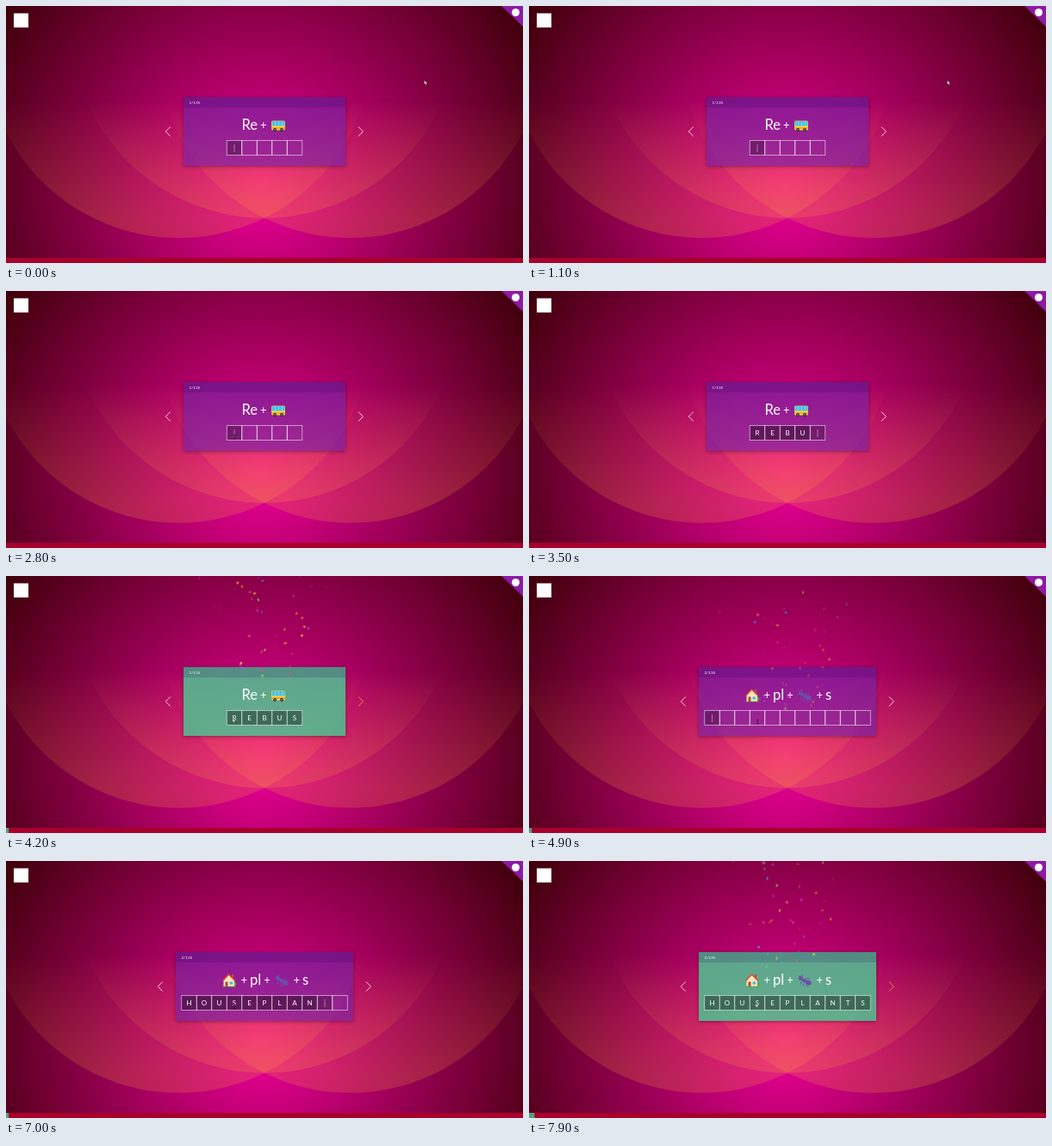
An HTML page that plays this animation: 600x299 px, repeating every 8 s.

```html
<!DOCTYPE html>
<html lang="en">
<head>
<meta charset="utf-8">
<title>Rebus cards</title>
<style>
html, body { margin: 0; width: 100%; height: 100%; overflow: hidden; background: #300; }
svg { position: absolute; left: 0; top: 0; width: 600px; height: 299px; }
text { font-family: Lato, sans-serif; fill: #fff; }
.clue { font-size: 16.5px; }
.plus { font-size: 13px; text-anchor: middle; }
.letter { font-size: 8px; font-weight: 500; text-anchor: middle; fill: #f2ecf2; }
.count { font-size: 4.6px; }
#card { position: absolute; top: 106px; height: 80px; box-shadow: 0 1px 4px rgba(0,0,0,.35); }
#card::before { content: ""; display: block; height: 12px; background: rgba(40,10,90,.16); }
</style>
</head>
<body>
<svg viewBox="0 0 600 299">
  <defs>
    <radialGradient id="glow" gradientUnits="userSpaceOnUse" cx="396" cy="281" r="514">
      <stop offset="0" stop-color="#e09"/><stop offset="1" stop-color="#300"/>
    </radialGradient>
    <linearGradient id="petal" gradientUnits="userSpaceOnUse" x1="400" y1="148" x2="400" y2="333">
      <stop offset="0" stop-color="#fa3" stop-opacity="0"/><stop offset="1" stop-color="#fa3" stop-opacity=".5"/>
    </linearGradient>
  </defs>
  <g transform="translate(0 -1) scale(.75)">
    <rect width="800" height="400" fill="url(#glow)"/>
    <g fill="url(#petal)" fill-opacity=".4">
      <circle cx="267.5" cy="61" r="300"/>
      <circle cx="532.5" cy="61" r="300"/>
      <circle cx="400" cy="30" r="300"/>
    </g>
  </g>
  <rect x="9" y="8.5" width="17" height="16.5" fill="#fff"/>
  <path d="M575 0H600V24Z" fill="#8c1aa2"/>
  <circle cx="591.5" cy="7.5" r="4.5" fill="#fff"/>
  <rect y="293" width="600" height="6" fill="#a8002c"/>
</svg>
<div id="card"></div>
<svg id="top" viewBox="0 0 600 299"></svg>
<script>
const LOOP = 8000, NEXT = 4520, CLICK = 2500, CELL = 17.5;
const card = document.getElementById('card'), overlay = document.getElementById('top');

const plus = x => `<text class="plus" x="${x}" y="143">+</text>`;
const clue = (x, s) => `<text class="clue" x="${x}" y="144">${s}</text>`;

const bus = `<g transform="translate(308 133)">
  <rect y=".5" width="16" height="11" rx="1.5" fill="#ffd23c"/>
  <path d="M1 1H15.5V6.5H.5Z" fill="#3ec3f0"/>
  <path d="M4.5 1V6.5M8.5 1V6.5M12.5 1V6.5" stroke="#e9e4b0" stroke-width=".5"/>
  <path d="M0 9H16" stroke="#e2801f"/>
  <circle cx="4" cy="11" r="1.9" fill="#28242c"/><circle cx="12" cy="11" r="1.9" fill="#28242c"/>
  <circle cx="4" cy="11" r=".7" fill="#ccc"/><circle cx="12" cy="11" r=".7" fill="#ccc"/></g>`;

const house = `<g transform="translate(251 131)">
  <circle cx="14" cy="12" r="2.2" fill="#55a83c"/>
  <rect x="11" y="1" width="2" height="5" fill="#a8553a"/>
  <path d="M1.5 8L7.5 1.5L14 8V15H1.5Z" fill="#f9e6b8"/>
  <path d="M.5 8.5L7.5 1L15 8.5" fill="none" stroke="#e0492c" stroke-width="1.4"/>
  <rect x="3.5" y="9.5" width="3" height="5.5" fill="#a5522e"/>
  <rect x="8.5" y="9.5" width="3.5" height="3" fill="#4fb4e8"/>
  <path d="M0 15.2H16" stroke="#4d9a38" stroke-width=".8"/></g>`;

const ant = `<g transform="translate(312 132)" fill="#6a4fa8" stroke="#6a4fa8">
  <g stroke="none"><circle cx="3.5" cy="4.5" r="2.5"/><ellipse cx="7.5" cy="7" rx="2.6" ry="1.9" transform="rotate(25 7.5 7)"/>
  <ellipse cx="12.3" cy="9.5" rx="3.5" ry="2.7" transform="rotate(25 12.3 9.5)"/></g>
  <path d="M3 3L4.5 .5L6 1M2 3L.5 1M6 7L3.5 9L3 12M8 8L6.5 11L7 14M9 8L10 12L12 14.5M8.5 6L11 4L13.5 5" fill="none" stroke-width=".9"/></g>`;

const rounds = [
  { word: 'REBUS', width: 188, first: 2880, step: 160, count: '1/135', from: 0,
    clue: clue(273.5, 'Re') + plus(298.7) + bus },
  { word: 'HOUSEPLANTS', width: 206, first: 5860, step: 133, count: '2/135', from: 3.2,
    clue: house + plus(276.2) + clue(283, 'pl') + plus(303) + ant + plus(337.2) + clue(344, 's') }
];
for (const r of rounds) r.solved = r.first + r.step * (r.word.length - 1);

const ease = (t, start, length) => {
  const k = Math.min(1, Math.max(0, (t - start) / length));
  return k * k * (3 - 2 * k);
};
const mix = (a, b, k) => a.map((v, i) => v + (b[i] - v) * k);

function seeded(seed) {
  return () => (seed = seed * 16807 % 2147483647) / 2147483647;
}

// Each piece slows by 10% per tick and drifts down at a constant rate.
const COLORS = ['#26ccff', '#a25afd', '#ff5e7e', '#88ff5a', '#fcff42', '#ffa62d', '#ff36ff'];
function confetti(t, start, seed) {
  const n = (t - start) / 1000 * 60;
  if (n < 0 || n >= 200) return '';
  const rnd = seeded(seed);
  let out = '';
  for (let i = 0; i < 50; i++) {
    const angle = -Math.PI / 2 + (rnd() - .5) * Math.PI / 4;
    const reach = 45 * (.5 + rnd()) * 10 * (1 - .9 ** n);
    const x = Math.cos(angle) * reach, y = Math.sin(angle) * reach + 3 * n;
    const wobble = rnd() * 10 + n * Math.min(.11, rnd() * .1 + .05);
    const tilt = (rnd() * .5 + .25) * Math.PI + n * .1, size = 2 + rnd();
    const wx = x + 10 * Math.cos(wobble), wy = y + 10 * Math.sin(wobble);
    const x1 = x + size * Math.cos(tilt), y1 = y + size * Math.sin(tilt);
    const x2 = wx + size * Math.cos(tilt), y2 = wy + size * Math.sin(tilt);
    const fill = `fill="${COLORS[i % 7]}"`;
    out += rnd() < .5
      ? `<path ${fill} d="M${x} ${y}L${wx} ${y1}L${x2} ${y2}L${x1} ${wy}Z"/>`
      : `<ellipse ${fill} rx="${Math.abs(x2 - x1) * .6}" ry="${Math.abs(y2 - y1) * .6}" transform="translate(${x} ${y}) rotate(${wobble * 18})"/>`;
  }
  return `<g opacity="${1 - n / 200}" transform="translate(300 149.5) scale(.3125)">${out}</g>`;
}

function cells(r, t, typed) {
  const left = 300 - r.word.length * CELL / 2;
  const lastKey = typed ? r.first + (typed - 1) * r.step : r === rounds[1] ? NEXT : t >= CLICK ? CLICK : 0;
  let out = '';
  [...r.word].forEach((ch, i) => {
    const x = left + i * CELL, mid = x + CELL / 2;
    const shade = i < typed ? .38 : i === typed ? .25 : 0;
    out += `<rect x="${x}" y="156.5" width="${CELL}" height="17" fill="#000" fill-opacity="${shade}" stroke="#fff" stroke-opacity=".65" stroke-width=".8"/>`;
    if (i < typed) out += `<text class="letter" x="${mid}" y="168">${ch}</text>`;
    else if (i === typed && (t - lastKey) % 1000 < 500)
      out += `<path d="M${mid} 161V170" stroke="#fff" stroke-opacity=".6" stroke-width=".7"/>`;
  });
  return out;
}

function pointer(t, solved) {
  const k = ease(t, 1600, 800);
  const [x, y] = mix([485.5, 86.5], [263, 165.5], k);
  if (k === 1 && !solved)
    return `<path d="M264 167.5H266.5M265.2 167.5V172M264 172H266.5" fill="none" stroke="#2b0c30" stroke-width=".7"/>`;
  return `<path transform="translate(${x} ${y})" d="M0 0V4.6L1.1 3.7L1.9 5.4L2.7 5L2 3.4H3.3Z" fill="#fff" stroke="#222" stroke-width=".35"/>`;
}

function draw(t) {
  const r = rounds[t < NEXT ? 0 : 1];
  const typed = Math.min(r.word.length, Math.max(0, Math.floor((t - r.first) / r.step) + 1));
  const solved = t >= r.solved, k = ease(t, r.solved, 250), left = 300 - r.width / 2;

  card.style.left = left + 'px';
  card.style.width = r.width + 'px';
  card.style.background = `rgba(${mix([112, 36, 170, .6], [78, 194, 146, .85], k)})`;

  const arrow = (x, dir, color) =>
    `<path d="M${x - 2.7 * dir} 140.5L${x + 2.7 * dir} 146L${x - 2.7 * dir} 151.5" fill="none" stroke="${color}" stroke-width=".8"/>`;
  overlay.innerHTML =
    `<rect y="293" width="${r.from + 3.2 * k}" height="6" fill="#5a9c80"/>` +
    `<text class="count" x="${left + 6.5}" y="113.8">${r.count}</text>` +
    arrow(left - 18, -1, '#fff') + arrow(600 - left + 17.7, 1, solved ? '#f5a637' : '#fff') +
    r.clue + cells(r, t, typed) +
    rounds.map((q, i) => confetti(t, q.solved, 4711 + i * 977)).join('') +
    pointer(t, solved);
}

const begin = performance.now();
function tick() {
  draw((performance.now() - begin) % LOOP);
  requestAnimationFrame(tick);
}
tick();
</script>
</body>
</html>
```
